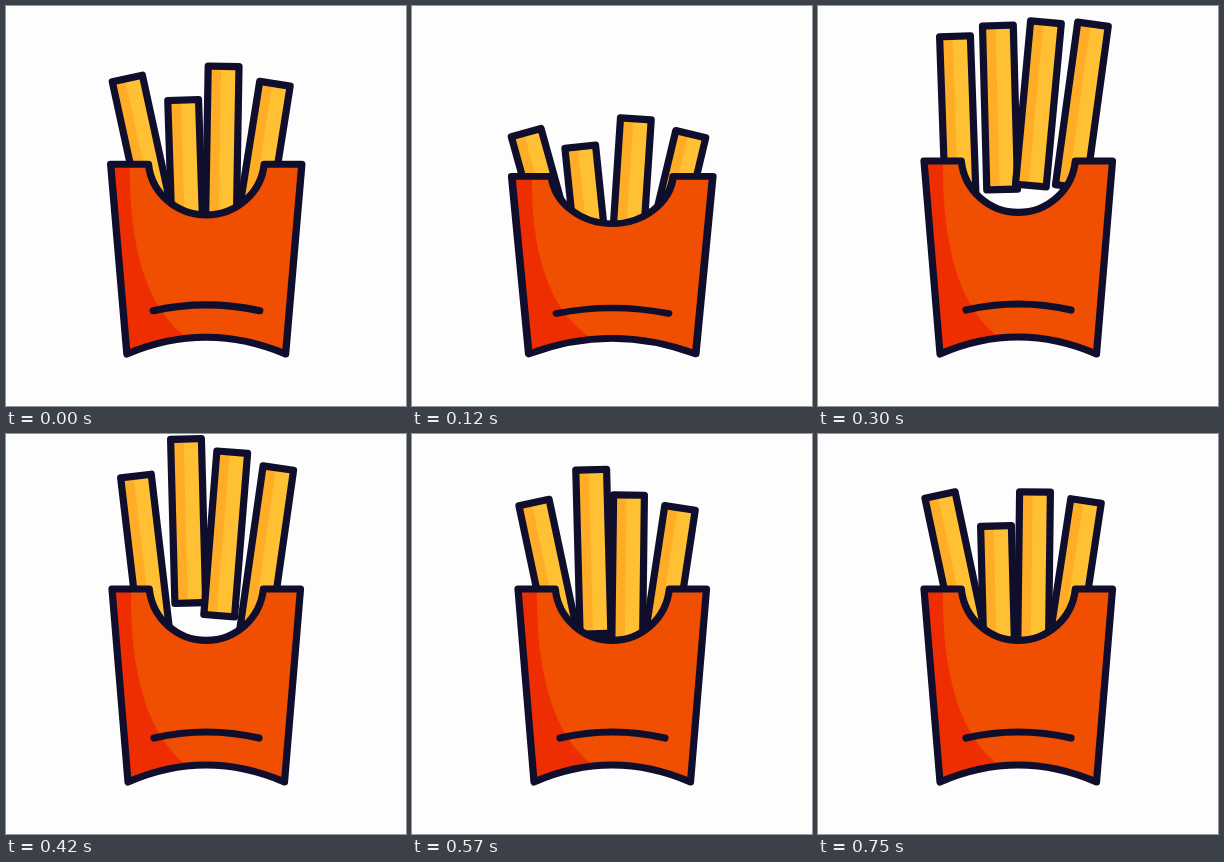
An HTML page that plays this animation: 400x400 px, repeating every 0.78 s.

```html
<!DOCTYPE html>
<html lang="en">
<head>
<meta charset="utf-8">
<title>Jumping fries</title>
<style>
  html, body { margin: 0; width: 100%; height: 100%; overflow: hidden; background: #fdfdfd; }
  svg { display: block; width: 100%; height: 100%; }
  .line { fill: none; stroke: #0f0e2c; stroke-width: 7.2; stroke-linejoin: round; stroke-linecap: round; }
</style>
</head>
<body>
<svg viewBox="0 0 400 400">
  <defs>
    <g id="fry">
      <rect x="-15.4" width="30.8" height="164" fill="#ffc033"/>
      <rect x="-15.4" width="13" height="164" fill="#ffad26"/>
      <rect class="line" x="-15.4" width="30.8" height="164"/>
    </g>
    <path id="pack" d="M106 155H143.3A57.3 57.3 0 0 0 257.3 155H294.5L278.5 348Q200 314 122 348Z"/>
  </defs>
  <g id="fries"></g>
  <g id="box">
    <use href="#pack" fill="#f04e00"/>
    <path fill="#ee2e00" d="M106 155H125C124 230 138 300 182 332Q150 336 122 348Z"/>
    <use href="#pack" class="line"/>
    <path class="line" d="M148 304Q200 292 253 304"/>
  </g>
</svg>
<script>
const LOOP = 780, STEP = 30;

// x, y, tilt: resting pose of the top edge
// dip, sink, spread: when the crouch starts, how deep and how far sideways it goes
// off, land, high: the leap; drift, turn: sideways shift and rotation in the air
const fries = [
  { x: 122, y: 61, tilt: -12, dip: -25, sink: 90, spread: -8, off: 180, land: 465, high: 31, drift: 15, turn: 10 },
  { x: 178, y: 92, tilt: -1.5, dip: -12, sink: 62, spread: -10, off: 180, land: 650, high: 87, drift: 2, turn: 0 },
  { x: 217, y: 58, tilt: .7, dip: -12, sink: 70, spread: 7, off: 180, land: 525, high: 44, drift: 11, turn: 4.6 },
  { x: 268, y: 67, tilt: 8.6, dip: -25, sink: 84, spread: 11, off: 160, land: 477, high: 49, drift: 7, turn: -.8 }
];

const part = (t, from, to) => Math.min(1, Math.max(0, (t - from) / (to - from)));
// Smooth swell from 0 to 1 and back
const hump = (t, from, to, power = 2) => Math.sin(Math.PI * part(t, from, to)) ** power;
// Ballistic rise and fall with a floating top
const arc = (t, from, to) => 1 - Math.abs(2 * part(t, from, to) - 1) ** 2.5;

function fryPose(f, t) {
  const sway = hump(t, -25, 240) * f.spread;
  const air = arc(t, 120, f.land);
  const y = f.y + f.sink * hump(t, f.dip, 190) - f.high * arc(t, f.off, f.land)
    + 9 * hump(t, f.land, LOOP - STEP);
  const tilt = f.tilt + .45 * sway + f.turn * air;
  return `translate(${f.x + sway + f.drift * air} ${y}) rotate(${tilt})`;
}

function boxPose(t) {
  const squash = hump(t, -35, 185, 3), stretch = hump(t, 135, 255, 3);
  const sx = 1 + .13 * squash - .03 * stretch;
  const sy = 1 - .155 * squash + .014 * stretch;
  return `translate(200.3 348) scale(${sx} ${sy}) translate(-200.3 -348)`;
}

const box = document.getElementById("box");
const group = document.getElementById("fries");
const sticks = fries.map(() => {
  const use = document.createElementNS("http://www.w3.org/2000/svg", "use");
  use.setAttribute("href", "#fry");
  return group.appendChild(use);
});

function draw(ms) {
  // The crouch begins one step before the loop point
  const t = Math.floor(((ms + STEP) % LOOP) / STEP) * STEP - STEP;
  fries.forEach((f, i) => sticks[i].setAttribute("transform", fryPose(f, t)));
  box.setAttribute("transform", boxPose(t));
}

let start;
function tick() {
  const now = performance.now();
  start ??= now;
  draw(now - start);
  requestAnimationFrame(tick);
}
draw(0);
requestAnimationFrame(tick);
</script>
</body>
</html>
```
